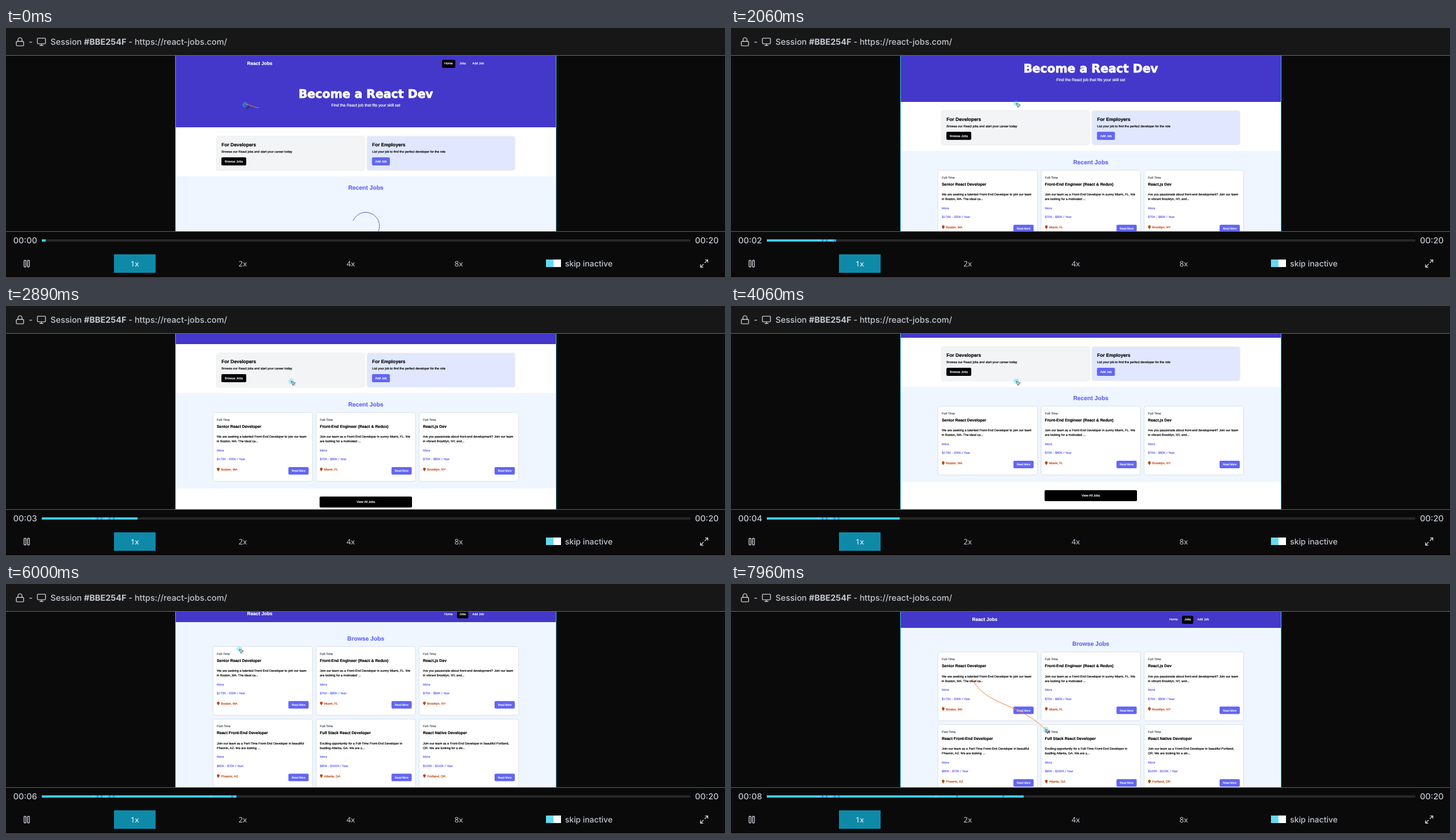
Animation, 1245 px wide and 433 px high, one loop 8 s. Source, as an HTML page:

```html
<!DOCTYPE html>
<html lang="en">
<head>
<meta charset="utf-8">
<title>Session replay</title>
<style>
html, body { margin: 0; width: 100%; height: 100%; overflow: hidden; background: #0a0a0a; }
svg { display: block; }
text { text-rendering: geometricPrecision; white-space: pre; stroke-width: 0; }
.ui { font-family: Inter, sans-serif; font-weight: 500; }
.speed { font-family: "Noto Sans", "Open Sans", sans-serif; }
.page { font-family: "Liberation Sans", Arial, sans-serif; }
.page text { stroke-width: .18; }
.page .hero { font-family: "DejaVu Sans", sans-serif; font-weight: 700; stroke-width: .8; }
.b { font-weight: 700; }
.mid { text-anchor: middle; }
.raised { filter: drop-shadow(0 .7px .8px #0003); }
.icon { fill: none; stroke: #c3c8d2; stroke-width: 2; stroke-linecap: round; stroke-linejoin: round; }
</style>
</head>
<body>
<svg id="stage" width="1245" height="433" viewBox="0 0 1245 433"></svg>
<script>
const INDIGO = '#4338ca', VIOLET = '#6366f1', PALE = '#eff6ff', GREY = '#c3c8d2';
const SCALE = .3432;
const [SMALL, BODY, LARGE, HEAD, TITLE] = [14, 16, 20, 24, 30].map(px => px * SCALE);

const rect = (x, y, w, h, fill, rx = 0, extra = '') =>
  `<rect x="${x}" y="${y}" width="${w}" height="${h}" fill="${fill}" rx="${rx}" ${rx ? '' : 'shape-rendering="crispEdges"'} ${extra}/>`;
const text = (x, y, str, size, fill, cls = '') =>
  `<text x="${x}" y="${y}" font-size="${size}" fill="${fill}" stroke="${fill}" class="${cls}">${str}</text>`;
const icon = (x, y, shapes) =>
  `<g class="icon" transform="translate(${x} ${y}) scale(.7)">${shapes}</g>`;
const button = (x, y, w, h, fill, label, size = BODY) =>
  rect(x, y, w, h, fill, 2) + text(x + w / 2, y + h / 2 + size * .36, label, size, '#fff', 'mid');

const jobs = [
  ['Full-Time', 'Senior React Developer', 'We are seeking a talented Front-End Developer to join our team', 'in Boston, MA. The ideal ca...', '$175K - 200K / Year', 'Boston, MA'],
  ['Full-Time', 'Front-End Engineer (React &amp; Redux)', 'Join our team as a Front-End Developer in sunny Miami, FL. We', 'are looking for a motivated ...', '$70K - $80K / Year', 'Miami, FL'],
  ['Full-Time', 'React.js Dev', 'Are you passionate about front-end development? Join our team', 'in vibrant Brooklyn, NY, and...', '$70K - $80K / Year', 'Brooklyn, NY'],
  ['Part-Time', 'React Front-End Developer', 'Join our team as a Part-Time Front-End Developer in beautiful', 'Pheonix, AZ. We are looking ...', '$60K - $70K / Year', 'Phoenix, AZ'],
  ['Full-Time', 'Full Stack React Developer', 'Exciting opportunity for a Full-Time Front-End Developer in', 'bustling Atlanta, GA. We are s...', '$90K - $100K / Year', 'Atlanta, GA'],
  ['Full-Time', 'React Native Developer', 'Join our team as a Front-End Developer in beautiful Portland,', 'OR. We are looking for a ski...', '$100K - $110K / Year', 'Portland, OR']
];

function card([type, title, line1, line2, pay, place], i, top) {
  const x = 359 + i % 3 * 178.5, y = top + Math.floor(i / 3) * 125.7, tx = x + 6;
  return rect(x, y, 171, 118, '#fff', 3, 'class="raised"') +
    text(tx, y + 14, type, BODY, '#4b5563') +
    text(tx, y + 26, title, LARGE, '#000', 'b') +
    text(tx, y + 43.2, line1, BODY, '#000') +
    text(tx, y + 51.3, line2, BODY, '#000') +
    text(tx, y + 67, 'More', BODY, VIOLET) +
    text(tx, y + 82.2, pay, BODY, VIOLET) +
    `<path d="M${tx + 2.5} ${y + 101.5}c-1-1.7-2.4-2.8-2.4-4.1a2.4 2.4 0 0 1 4.8 0c0 1.3-1.4 2.4-2.4 4.1z" fill="#b9480f"/>` +
    text(tx + 7.3, y + 100.2, place, BODY, '#c2410c') +
    button(x + 130, y + 94, 35, 13, VIOLET, 'Read More', SMALL);
}

const cards = (count, top) => jobs.slice(0, count).map((job, i) => card(job, i, top)).join('');

function nav(active) {
  const links = [['Home', 759, 15], ['Jobs', 785, 11.5], ['Add Job', 807.5, 20]];
  return text(417.5, 64, 'React Jobs', HEAD, '#fff', 'b') + links.map(([name, x, w]) =>
    (name === active ? rect(x - 4, 55, w + 8, 14, '#000', 2) : '') + text(x, 63.2, name, BODY, '#fff')).join('');
}

const panel = (x, fill, title, note, w, btn, label) =>
  rect(x, 188, 255, 58, fill, 3, 'class="raised"') +
  text(x + 8.3, 204.8, title, HEAD, '#000', 'b') +
  text(x + 8.3, 216, note, BODY, '#000') +
  button(x + 8, 224, w, 14, btn, label);

const arc = id => `<path id="${id}" d="M-18.2 18.2A25.7 25.7 0 1 1 18.2 18.2" fill="none" stroke="${INDIGO}" stroke-width=".8"/>`;

const home =
  rect(293, 48, 660, 124, INDIGO) + nav('Home') +
  text(623, 121, 'Become a React Dev', 20.25, '#fff', 'hero mid') +
  text(623, 135.8, 'Find the React job that fits your skill set', LARGE, '#fff', 'mid') +
  panel(365, '#f3f4f6', 'For Developers', 'Browse our React jobs and start your career today', 43, '#000', 'Browse Jobs') +
  panel(625.7, '#e0e7ff', 'For Employers', 'List your job to find the perfect developer for the role', 31, VIOLET, 'Add Job') +
  rect(293, 257, 660, 165, PALE) +
  text(623, 280.2, 'Recent Jobs', TITLE, VIOLET, 'b mid') +
  arc('homeSpin') + `<g id="homeCards">${cards(3, 291)}</g>` +
  button(543, 436, 160, 19, '#000', 'View All Jobs');

const browse =
  rect(293, 48, 660, 400, PALE) + rect(293, 48, 660, 27.6, INDIGO) + nav('Jobs') +
  text(623, 107.4, 'Browse Jobs', TITLE, VIOLET, 'b mid') +
  arc('jobsSpin') + `<g id="jobsCards">${cards(6, 118.3)}</g>`;

const pointer = '<path d="M3 3l7.07 16.97 2.51-7.39 7.39-2.51zM13 13l6 6" fill="none" stroke="#1c2238" stroke-width="1.5" transform="translate(-1.5 -1.5) scale(.44)"/>';

// Activity marks on the timeline: one cluster, then a few strays
const marks = [...Array.from({ length: 6 }, (_, i) => 150 + 7 * i), 353, 390, 470];

const $ = id => document.getElementById(id);
$('stage').innerHTML =
  '<clipPath id="view"><rect x="293" y="48" width="660" height="304"/></clipPath>' +
  '<clipPath id="played"><rect id="playedBox" y="366" height="4"/></clipPath>' +
  rect(0, 0, 1245, 433, '#0a0a0a') + rect(0, 0, 1245, 47, '#171717') +
  icon(15.8, 15.5, '<rect x="3" y="11" width="18" height="11" rx="2"/><path d="M7 11V7a5 5 0 0 1 10 0v4"/>') +
  text(39.5, 29, '-', 14.4, GREY, 'ui') +
  icon(53, 15.5, '<rect x="2" y="3" width="20" height="14" rx="2"/><path d="M8 21h8M12 17v4"/>') +
  text(77, 29, 'Session <tspan class="b">#BBE254F</tspan> - https://react-jobs.com/', 14.4, GREY, 'ui') +
  `<g clip-path="url(#view)" class="page">${rect(293, 48, 660, 304, '#fff')}
    <g id="home">${home}</g><g id="jobs">${browse}</g>
    <polyline id="trail" fill="none" stroke="#f97f2a"/>
    <g id="cursor"><circle r="4.8" fill="#22d3ee" opacity=".35"/>${pointer}</g></g>` +
  [293, 952].map(x => rect(x, 48, 1, 304, '#35c3dc')).join('') +
  rect(0, 47, 1245, 1, '#2f7f8e') + [352, 432].map(y => rect(0, y, 1245, 1, '#0e7f92')).join('') +
  `<text id="clock" x="12.5" y="373" font-size="14.4" fill="${GREY}" class="ui"></text>` +
  text(1193, 373, '00:20', 14.4, GREY, 'ui') +
  '<rect id="track" y="366" height="4" fill="#27272a"/>' +
  `<g clip-path="url(#played)">${rect(50, 366, 1135, 4, '#3bcdea')}
    ${marks.map((x, i) => rect(x, 366, 3, 4, i % 3 ? '#3b82e0' : '#7cc4f5', 0, 'opacity=".8"')).join('')}</g>` +
  icon(27.5, 399.7, '<rect x="5.5" y="4" width="4.5" height="16" rx="1"/><rect x="14" y="4" width="4.5" height="16" rx="1"/>') +
  rect(187, 392, 72, 32, '#0e8aa8') +
  [1, 2, 4, 8].map((n, i) => text(223 + i * 187, 413, n + 'x', 13, i ? GREY : '#fff', 'speed mid')).join('') +
  rect(935, 401, 13, 13, '#67d8ee') + rect(948, 401, 13, 13, '#fff') +
  text(968, 413, 'skip inactive', 13.8, GREY, 'ui') +
  icon(1200.5, 399.5, '<path d="M15 3h6v6M9 21H3v-6M21 3l-7 7M3 21l7-7"/>');

const LOOP = 8000, LENGTH = 20400, LEAD = 120, TRAIL = 520;
const WHEEL = 100 * SCALE, MAX_SCROLL = 117, JOBS_SCROLL = 28 * SCALE;
const wheelTimes = [1550, 1955, 2470, 2835];
const OPEN_JOBS = 5520, HOME_LOADED = 400, JOBS_LOADED = 5800;

// Mouse strokes: start, duration, then a cubic curve
const strokes = [
  [-350, 350, [438, 138], [426, 137], [420, 131], [414, 133]],
  [300, 600, [414, 133], [440, 129], [470, 129], [494, 130.5]],
  [4580, 500, [494, 130.5], [465, 128], [430, 118], [404, 113]],
  [7300, 660, [404, 113], [415, 220], [480, 190], [545, 252]]
];

const clamp = p => Math.min(1, Math.max(0, p));
const ease = p => (p = clamp(p), p * p * (3 - 2 * p));

function mouse(t) {
  const [start, span, a, b, c, d] = strokes.findLast(s => s[0] <= t) || strokes[0];
  const p = clamp((t - start) / span), q = 1 - p;
  return [0, 1].map(k => q * q * q * a[k] + 3 * q * q * p * b[k] + 3 * q * p * p * c[k] + p * p * p * d[k]);
}

const homeScroll = t =>
  Math.min(MAX_SCROLL, wheelTimes.reduce((sum, at) => sum + WHEEL * ease((t - at) / 300), 0));
const jobsScroll = t => JOBS_SCROLL * (1 - ease((t - 6080) / 250));

const show = (id, on) => $(id).setAttribute('display', on ? 'inline' : 'none');
const move = (id, x, y, rest = '') => $(id).setAttribute('transform', `translate(${x} ${y}) ${rest}`);

function box(id, left, right) {
  $(id).setAttribute('x', left);
  $(id).setAttribute('width', right - left);
}

function spin(id, y, t) {
  const angle = (67 + t * .48) % 360;
  move(id, 623, y, `rotate(${angle}) scale(${.8 + .2 * Math.abs(1 - angle / 180)})`);
}

function draw(t) {
  const onJobs = t >= OPEN_JOBS;
  show('home', !onJobs);
  show('jobs', onJobs);
  show('homeCards', t >= HOME_LOADED);
  show('homeSpin', t < HOME_LOADED);
  show('jobsCards', t >= JOBS_LOADED);
  show('jobsSpin', t < JOBS_LOADED);
  move('home', 0, -homeScroll(t));
  move('jobs', 0, -jobsScroll(t));
  spin('homeSpin', 343, t);
  spin('jobsSpin', 170, t);

  move('cursor', ...mouse(t));
  const points = [];
  for (let age = TRAIL; age >= 0; age -= 20) points.push(mouse(t - age).join());
  $('trail').setAttribute('points', points.join(' '));

  const played = t + LEAD, clock = $('clock');
  clock.textContent = '00:0' + Math.floor(played / 1000);
  const left = Math.round(20.5 + clock.getComputedTextLength());
  box('track', left, 1185);
  box('playedBox', left, left + (1185 - left) * played / LENGTH);
}

const began = performance.now();
function tick() {
  draw((performance.now() - began) % LOOP);
  requestAnimationFrame(tick);
}
tick();
</script>
</body>
</html>
```
